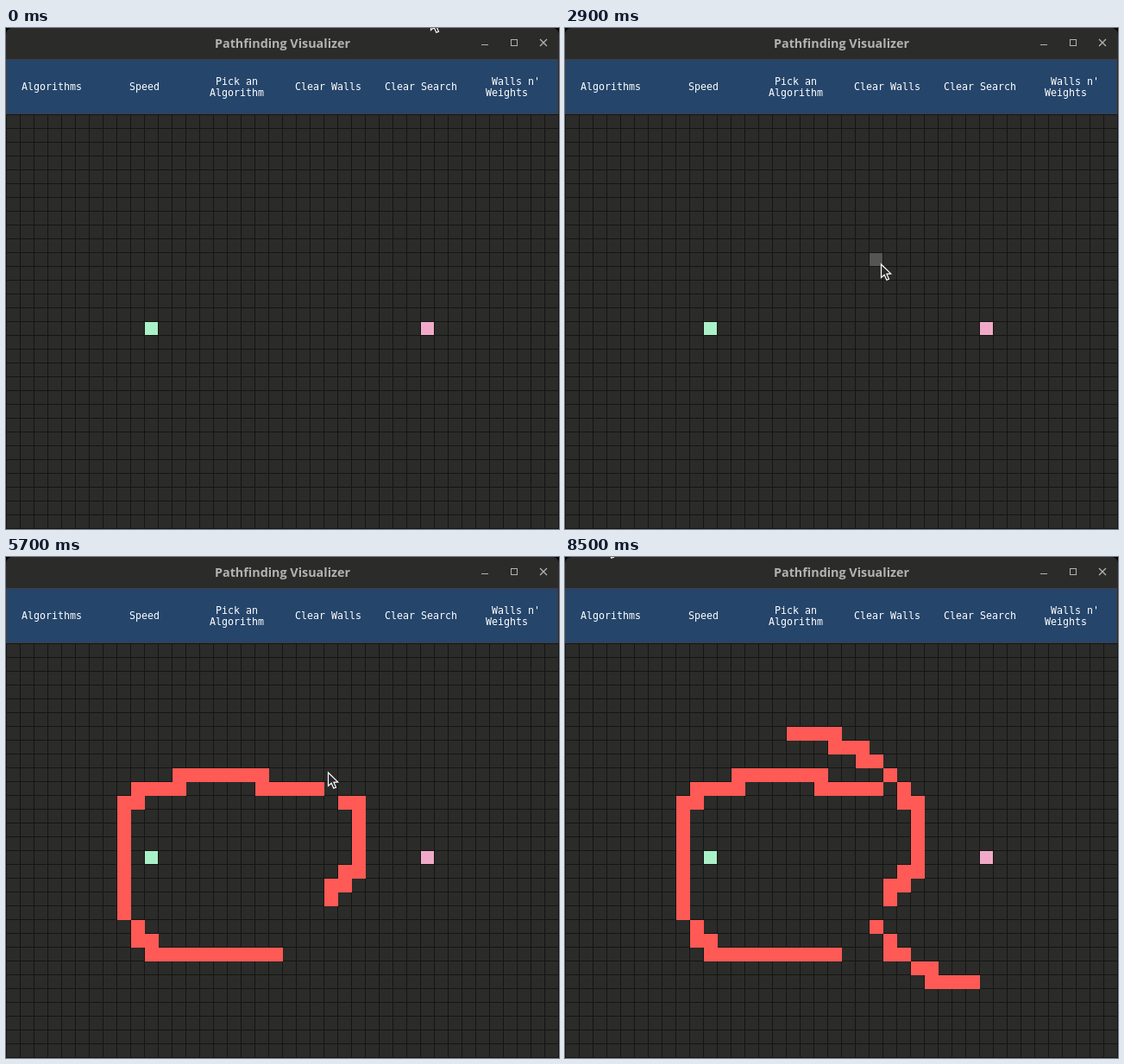
Recreate the animation shown at these times as an HTML page with a canvas. Size 641 by 581 pixels, loop 8800 ms.

```html
<!DOCTYPE html>
<html lang="en">
<head>
<meta charset="utf-8">
<title>Pathfinding Visualizer</title>
<style>
html, body { margin: 0; width: 100%; height: 100%; overflow: hidden; background: #2b2b29; }
canvas { display: block; }
</style>
</head>
<body>
<canvas id="stage" width="641" height="581"></canvas>
<script>
const ctx = document.getElementById('stage').getContext('2d');
const LOOP = 8800, TICK = 100;
const HOVER_LAG = 50, WALL_LAG = 150;
const CELL = 16, TOP = 100, CHAR = 7, COLUMN = 106.8;
const NAVY = '#25456b', DARK = '#2b2b29', LINE = '#151514', BORDER = '#3f3f49';
const RED = '#ff5a55', GREY = '#b3b3b0';

const BUTTONS = [['Algorithms'], ['Speed'], [' Pick an', 'Algorithm'],
  ['Clear Walls'], ['Clear Search'], [" Walls n'", 'Weights']];
const MENU = { x: 539, y: 104, w: 64, row: 32, open: 800, close: 2500,
  items: ['Walls', 'Weights', 'Bombs'] };

// strokes dragged through these points, in cells
const STROKES = [
  stroke(3250, 1400, [[22.8, 10.8], [15.5, 9.3], [9.2, 10.95], [8.5, 11.9],
    [8.5, 19.3], [10.5, 22.1], [19.6, 22.6]]),
  stroke(5050, 1100, [[23.5, 18.6], [25.4, 16.1], [25.3, 11.5], [24, 10],
    [23, 9], [20.5, 7.5], [16.5, 6.1]]),
  stroke(6750, 600, [[22.6, 20.3], [23.6, 22.05], [25, 23], [26.8, 24.1], [29.5, 24.5]])
];

// pointer stops between strokes: time, x, y
const STOPS = [
  [0, 492, -14], [700, 553, 51], [1000, 553, 51], [1500, 573, 146], [1800, 573, 146],
  [2200, 575, 120], [2500, 575, 120], [2750, 362, 270], [2900, 366, 273], [3050, 306, 263],
  [4800, 331, 438], [4900, 362, 405], [6500, 265, 198.6], [6600, 302, 259],
  [7500, 473, 493], [8000, 149, 12], [8100, 100, -30], [8300, 67, -14], [8500, 47, -18]
];
const POINTER = [...STOPS, ...STROKES.flatMap(s => s.trail)].sort((a, b) => a[0] - b[0]);

// timed pointer trail plus the cells it crosses, at constant speed
function stroke(start, length, points) {
  const SAMPLES = 97;
  const spans = points.slice(1).map(([x, y], i) => Math.hypot(x - points[i][0], y - points[i][1]));
  const total = spans.reduce((a, b) => a + b);
  const trail = [], cells = [];
  let done = 0;
  points.forEach(([x, y], i) => {
    trail.push([start + length * done / total, 1 + x * CELL, TOP + 1 + y * CELL]);
    if (i === spans.length) return;
    const [nx, ny] = points[i + 1];
    for (let k = 0; k < SAMPLES; k++) {
      const f = k / SAMPLES;
      const c = Math.floor(x + (nx - x) * f), r = Math.floor(y + (ny - y) * f);
      const last = cells[cells.length - 1];
      if (last && last.c === c && last.r === r) continue;
      cells.push({ c, r, time: start + WALL_LAG + length * (done + spans[i] * f) / total });
    }
    done += spans[i];
  });
  return { trail, cells, start, end: start + length + WALL_LAG };
}

function pointerAt(t) {
  const i = POINTER.findIndex(k => k[0] > t);
  if (i <= 0) return (i ? POINTER[POINTER.length - 1] : POINTER[0]).slice(1);
  const [t0, x0, y0] = POINTER[i - 1], [t1, x1, y1] = POINTER[i];
  const f = (t - t0) / (t1 - t0);
  return [x0 + (x1 - x0) * f, y0 + (y1 - y0) * f];
}

function rect(color, x, y, w, h) {
  ctx.fillStyle = color;
  ctx.fillRect(x, y, w, h);
}

function panel(x, y, w, h) {
  rect(BORDER, x, y, w, h);
  rect(NAVY, x + 1, y + 1, w - 2, h - 2);
}

function text(str, x, y) {
  ctx.font = '11.63px "DejaVu Sans Mono", monospace';
  ctx.textAlign = 'left';
  ctx.fillStyle = '#fff';
  ctx.fillText(str, x, y);
}

function cell(color, c, r, size = CELL - 1) {
  rect(color, c * CELL + 1, TOP + r * CELL + 1, size, size);
}

function drawTitleBar() {
  rect('#000', 0, 0, 641, 36);
  ctx.fillStyle = DARK;
  ctx.beginPath();
  ctx.roundRect(0, 0, 641, 36, [7, 7, 0, 0]);
  ctx.fill();
  ctx.font = 'bold 14.35px "Open Sans", "Noto Sans", sans-serif';
  ctx.textAlign = 'center';
  ctx.fillStyle = GREY;
  ctx.fillText('Pathfinding Visualizer', 320.5, 23);
  rect(GREY, 551, 19, 8, 1);
  ctx.strokeStyle = GREY;
  ctx.lineWidth = 1;
  ctx.strokeRect(585.5, 13.5, 7, 7);
  ctx.lineWidth = 1.3;
  ctx.beginPath();
  ctx.moveTo(619, 13); ctx.lineTo(627, 21);
  ctx.moveTo(627, 13); ctx.lineTo(619, 21);
  ctx.stroke();
}

function drawButtons(x, y) {
  rect(DARK, 0, 36, 641, 64);
  panel(0, 36, 640, 64);
  const hot = y >= 37 && y < TOP ? Math.floor(x / COLUMN) : -1;
  BUTTONS.forEach((lines, i) => {
    if (i === hot) rect('#0f87fa', Math.round(1 + i * COLUMN), 37, 104, 62);
    const width = CHAR * Math.max(...lines.map(s => s.length));
    const left = Math.round((i + 0.5) * COLUMN - width / 2);
    const base = lines.length > 1 ? 66 : 72;
    lines.forEach((s, j) => text(s, left, base + j * 13));
  });
}

function drawGrid() {
  rect(DARK, 0, TOP, 641, 481);
  for (let x = 0; x <= 640; x += CELL) rect(LINE, x, TOP, 1, 481);
  for (let y = TOP; y <= 580; y += CELL) rect(LINE, 0, y, 641, 1);
}

function drawMenu(hy) {
  const { x, y, w, row, items } = MENU;
  panel(x, y, w, row * items.length);
  items.forEach((label, i) => {
    const top = y + i * row;
    if (hy >= top && hy < top + row) {
      const first = i ? 0 : 1;
      rect('#4296fa', x + 1, top + first, w - 2, row - first);
    }
    text(label, Math.floor(x + w / 2 - 1 - label.length * CHAR / 2), top + 20);
  });
}

function drawPointer(x, y) {
  ctx.save();
  ctx.translate(Math.round(x) + 0.5, Math.round(y) + 0.5);
  ctx.beginPath();
  ctx.moveTo(0, 0.5);
  for (const [px, py] of [[0, 16], [3.7, 12.8], [6.3, 18.8], [9, 17.6], [6.4, 11.8], [11.2, 11.4]]) {
    ctx.lineTo(px, py);
  }
  ctx.closePath();
  ctx.fillStyle = '#2a2a2a';
  ctx.strokeStyle = '#fff';
  ctx.lineWidth = 1.2;
  ctx.fill();
  ctx.stroke();
  ctx.restore();
}

function draw(t) {
  const [x, y] = pointerAt(t);
  const [hx, hy] = pointerAt(t - HOVER_LAG);
  const menuOpen = t >= MENU.open && t < MENU.close;
  const dragging = STROKES.some(s => t >= s.start && t <= s.end);

  drawTitleBar();
  drawGrid();
  drawButtons(x, y);
  if (hy > TOP && !menuOpen && !dragging) {
    cell('#555553', Math.floor((hx - 1) / CELL), Math.floor((hy - TOP - 1) / CELL));
  }
  for (const { cells } of STROKES) {
    for (const { c, r, time } of cells) if (time <= t) cell(RED, c, r, CELL);
  }
  cell('#aaf0c8', 10, 15);
  cell('#f0aac8', 30, 15);
  if (menuOpen) drawMenu(hy);
  drawPointer(x, y);
}

function loop() {
  const t = performance.now() % LOOP;
  draw(Math.floor(t / TICK) * TICK);
  requestAnimationFrame(loop);
}
loop();
</script>
</body>
</html>
```
